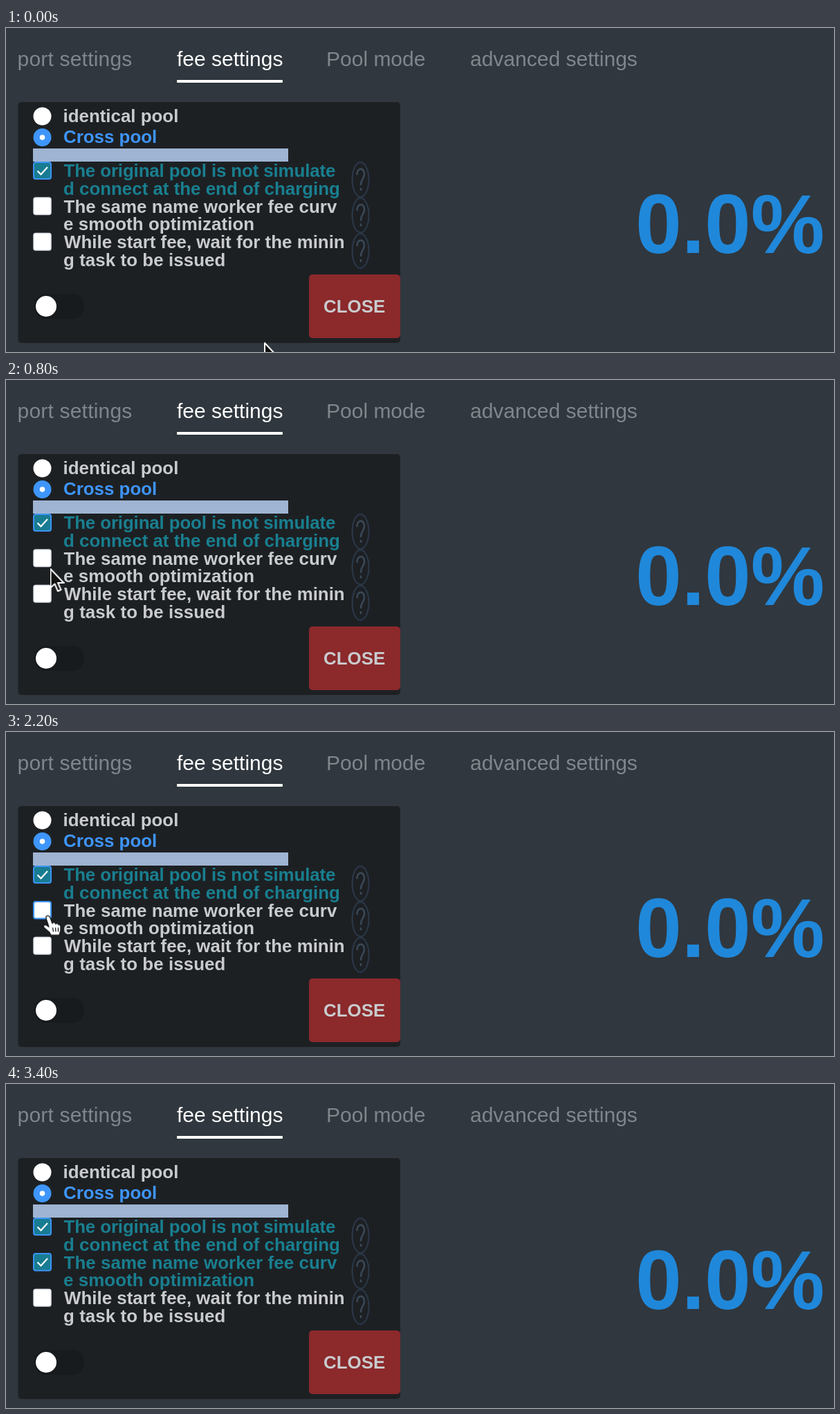
Recreate the animation shown at these times as an HTML page. Size 1197 by 468 pixels, loop 3.5 s.

```html
<!DOCTYPE html>
<html lang="en">
<head>
<meta charset="utf-8">
<title>Fee settings</title>
<style>
  html, body { margin: 0; width: 100%; height: 100%; overflow: hidden; background: #30373e; }
  svg { display: block; width: 1197px; height: 468px; }
  text { font-family: "Liberation Sans", Arial, Helvetica, sans-serif; }
  .tab { font-size: 30px; fill: #80868c; }
  .on { fill: #fff; }
  .label { font-size: 25.9px; font-weight: bold; fill: #c9cbcd; }
  .blue { fill: #3e95fb; }
  .teal { fill: #197f90; }
  .rate { font-size: 120px; font-weight: bold; fill: #2088da; }
  .box { fill: #fff; stroke: #dcdfe6; stroke-width: 1.5; }
  .checked { fill: #187c92; stroke: #3b93f6; stroke-width: 2; }
  .tick { fill: none; stroke: #fff; stroke-width: 2.2; }
  .help { fill: none; stroke: #2b394a; stroke-width: 2; }
  .help path { stroke: #3a4858; stroke-width: 2.6; }

  #box2, #text2, #tick2, #arrow, #hand, #pointer { animation: 3500ms step-end infinite; }
  #box2 { animation-name: box; }
  #text2 { animation-name: label; }
  #tick2 { animation-name: show-tick; }
  #arrow { animation-name: show-arrow; }
  #hand { animation-name: show-hand; }
  #pointer { animation-name: move; }

  @keyframes box {
    0% { fill: #fff; stroke: #dcdfe6; stroke-width: 1.5px; }
    34.27% { fill: #fff; stroke: #3b93f6; stroke-width: 2px; }
    68.56%, 100% { fill: #187c92; stroke: #3b93f6; stroke-width: 2px; }
  }
  @keyframes label {
    0% { fill: #c9cbcd; }
    68.56%, 100% { fill: #197f90; }
  }
  @keyframes show-tick {
    0% { opacity: 0; }
    68.56%, 100% { opacity: 1; }
  }
  @keyframes show-arrow {
    0% { opacity: 1; }
    39.99%, 100% { opacity: 0; }
  }
  @keyframes show-hand {
    0% { opacity: 0; }
    39.99% { opacity: 1; }
    94.28%, 100% { opacity: 0; }
  }
  /* the pointer advances ten times a second */
  @keyframes move {
    0% { transform: translate(374px, 455px); animation-timing-function: steps(6, end); }
    17.14% { transform: translate(95px, 278px); animation-timing-function: steps(4, end); }
    28.56% { transform: translate(34px, 268px); animation-timing-function: steps(2, end); }
    34.28% { transform: translate(60px, 264px); }
    37.13% { transform: translate(40px, 266px); }
    39.99% { transform: translate(57px, 268px); }
    42.85% { transform: translate(57px, 268px); animation-timing-function: steps(3, end); }
    51.42% { transform: translate(65.5px, 272.5px); animation-timing-function: steps(4, end); }
    62.85%, 100% { transform: translate(59px, 265.5px); }
  }
</style>
</head>
<body>
<svg viewBox="0 0 1197 468">
  <defs>
    <path id="tick" class="tick" d="M45.5 206.5L50.5 211.5L60 201"/>
    <g id="help" class="help">
      <ellipse cx="512.5" cy="219" rx="12" ry="25"/>
      <path d="M507.5 212C507.5 201 518 201 518 211C518 218 513 217 513 227M513 231V235"/>
    </g>
  </defs>

  <text class="tab" x="16.5" y="54.5" letter-spacing=".2">port settings</text>
  <text class="tab on" x="247" y="54.5">fee settings</text>
  <text class="tab" x="463" y="54.5">Pool mode</text>
  <text class="tab" x="671" y="54.5">advanced settings</text>
  <rect x="247" y="75" width="153" height="4" rx="1" fill="#fff"/>

  <rect x="17.5" y="107" width="552.5" height="348" rx="5" fill="#1d2023"/>

  <circle cx="52.5" cy="127.5" r="13" fill="#fff"/>
  <text class="label" x="82.5" y="136">identical pool</text>
  <circle cx="52.5" cy="158" r="13" fill="#3e95fb"/>
  <circle cx="52.5" cy="158" r="3.8" fill="#fff"/>
  <text class="label blue" x="83" y="166">Cross pool</text>
  <rect x="39" y="174" width="369" height="19" fill="#9fb4d2"/>

  <rect class="box checked" x="40" y="194" width="25" height="24" rx="3"/>
  <use href="#tick"/>
  <text class="label teal" x="83.5" y="215" letter-spacing="-.13">The original pool is not simulate</text>
  <text class="label teal" x="83" y="241">d connect at the end of charging</text>

  <rect id="box2" class="box" x="40" y="245" width="25" height="24.5" rx="3"/>
  <g id="tick2"><use href="#tick" y="51"/></g>
  <g id="text2" class="label">
    <text x="83.5" y="266.5" letter-spacing=".07">The same name worker fee curv</text>
    <text x="83" y="292" letter-spacing=".07">e smooth optimization</text>
  </g>

  <rect class="box" x="40" y="296.5" width="25" height="24.5" rx="3"/>
  <text class="label" x="84" y="318">While start fee, wait for the minin</text>
  <text class="label" x="83" y="343.5" letter-spacing=".07">g task to be issued</text>

  <use href="#help"/>
  <use href="#help" y="51.5"/>
  <use href="#help" y="103"/>

  <rect x="41" y="384" width="72" height="36" rx="16" fill="#171b1e"/>
  <circle cx="58" cy="402" r="15" fill="#fff"/>

  <rect x="438" y="356" width="132" height="92" rx="5" fill="#8b292b"/>
  <text class="label" x="459" y="411">CLOSE</text>

  <text class="rate" x="910" y="325">0.0%</text>

  <g id="pointer">
    <path id="arrow" d="M0 0V27L6 21.5L10.5 32L15 30L10.5 20H19Z" fill="#111" stroke="#fff" stroke-width="2" stroke-linejoin="round"/>
    <g id="hand" stroke="#15181b" stroke-width="1.3" stroke-linejoin="round">
      <path d="M-1 1C1-1 4 0 5 3L8 11C9 9 12 9 13 12C14 10 16 11 17 13C19 12 20 14 20 16V21L18 28H6L4 24L-4 17C-6 14-3 12 0 14L3 16L-1 4Z" fill="#fff"/>
      <path d="M8.5 17L9.5 23M12.5 17L13 23M16.5 17V23" fill="none"/>
    </g>
  </g>
</svg>
</body>
</html>
```
